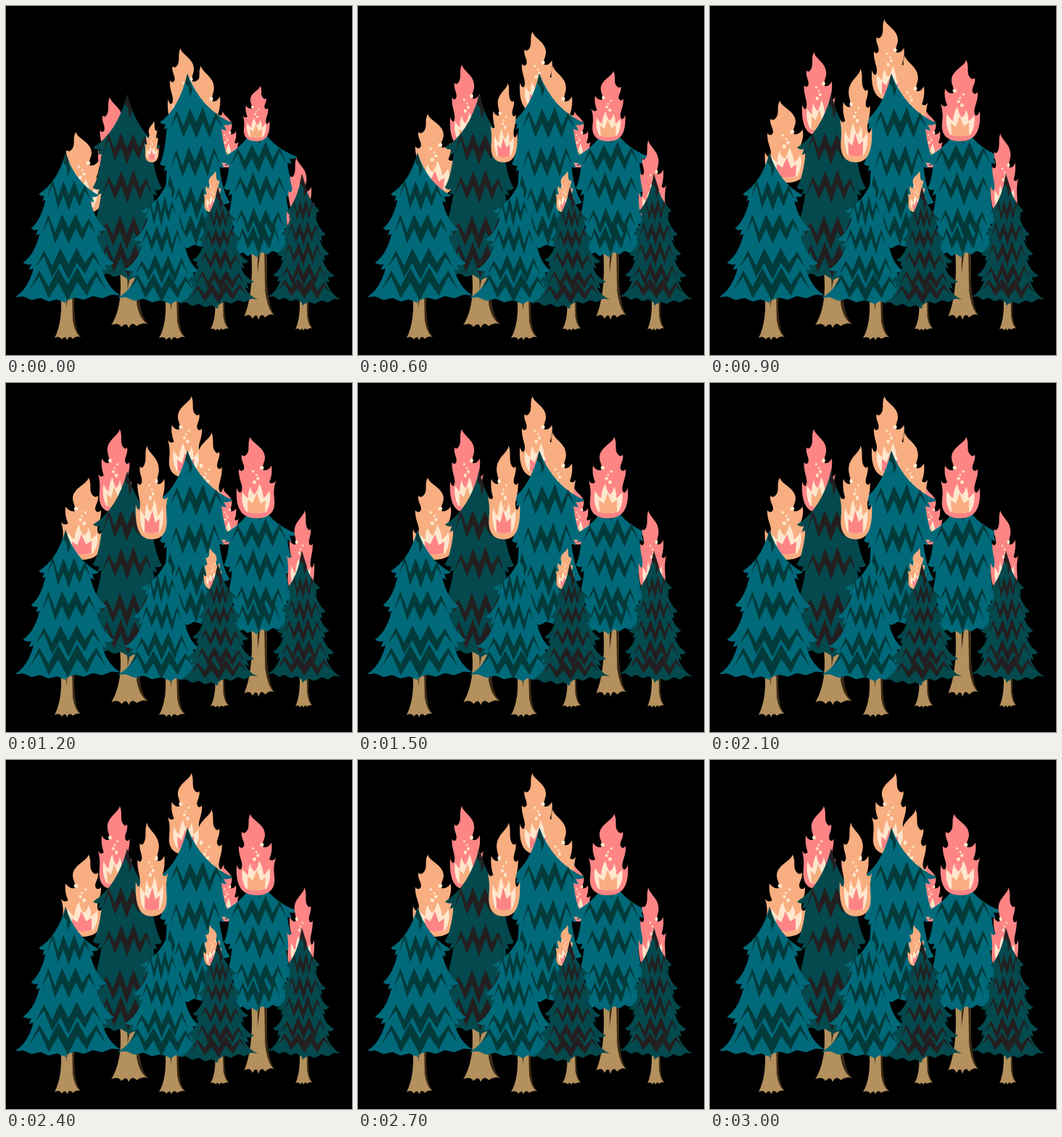
These frames come from a looping animation (477 px wide and 480 px high, 3300 ms). An HTML page with a canvas:

```html
<!DOCTYPE html>
<html lang="en">
<head>
<meta charset="utf-8">
<title>Burning forest</title>
<style>
  html, body { margin: 0; width: 100%; height: 100%; overflow: hidden; background: #000; }
  canvas { display: block; }
</style>
</head>
<body>
<canvas id="stage" width="477" height="480"></canvas>
<script>
const ctx = document.getElementById('stage').getContext('2d');
const STEP = 300, STEPS = 11, GROWN = 3, FLAME_HEIGHT = 113;
const ORANGE = '#f8ae80', PINK = '#ff8585', CREAM = '#ffe6cc';
const TEAL = ['#006a7a', '#033b3b'], DARK = ['#04494d', '#231f20'];
const WOOD = '#b3905d', BARK = '#3a2915';

const mix = (a, b, t) => a + (b - a) * t;
const noise = n => Math.abs(Math.sin(n * 12.9898) * 43758.5453) % 1;

// Flames stand on the origin, trunks hang from it.
const flameBody = new Path2D(`M8-113C7-104-12-99-12-84C-12-78-8-74-9-67
  Q-16-65-21-73Q-23-62-18-50Q-23-46-27-52Q-23-40-25-26C-27-8-17 0 0 0
  C18 0 29-10 27-42Q24-34 21-36C16-44 25-53 24-68Q20-63 17-68
  C15-74 22-80 20-88Q17-84 13-89C8-96 13-104 8-113Z`);
const flameGlow = new Path2D(`M-14-9Q-22-24-18-38Q-14-30-10-28Q-9-40-4-48Q-2-38 2-33
  Q7-36 8-44Q12-36 11-28Q15-30 19-36Q22-22 14-9Q0-5-14-9Z`);
const flameCore = new Path2D('M-12-9L-13-25L-6-20L-1-35L5-21L12-26L12-9Q0-5-12-9Z');
const trunkShape = new Path2D(`M-9 0C-6 25-9 44-17 57Q-10 54-7 59Q-2 53 0 60
  Q3 53 8 58Q14 54 19 56C9 46 9 24 11 0Z`);
const trunkShade = new Path2D('M7 0L11 0C9 24 10 46 19 56Q11 52 8 36ZM-1 0L3 0L-1 22Z');

const sparks = new Path2D();
for (let i = 0; i < 5; i++) {
  const x = mix(-12, 14, noise(i + 3)), y = -50 - i * 5, r = mix(1.4, 3, noise(i + 8));
  sparks.moveTo(x + r, y);
  sparks.arc(x, y, r, 0, 7);
}

function fill(shape, color) {
  ctx.fillStyle = color;
  ctx.fill(shape);
}

function placed(x, y, sx, sy, paint) {
  ctx.save();
  ctx.translate(x, y);
  ctx.scale(sx, sy);
  paint();
  ctx.restore();
}

// A flame climbs by "rise" pixels, or grows from the scale "from", and then sways.
function flame({ x, base, height, color, width = 1, lean = -1, rise = 0, from = 1, delay = 0, sways = true }, step) {
  const time = Math.min(1, Math.max(0, (step - delay) / (GROWN - delay)));
  const growth = time ** .8, size = mix(from, 1, growth);
  const side = sways && step > GROWN && step % 2 === 0 ? -lean : lean;
  placed(x, base + rise * (1 - growth), side * width * size, height / FLAME_HEIGHT * size, () => {
    fill(flameBody, color);
    fill(flameGlow, CREAM);
    fill(flameCore, color === PINK ? ORANGE : PINK);
    fill(sparks, CREAM);
  });
}

// Branch tips spread evenly down one side of a tree; side is -1 or 1.
function branchTips({ x, lean = 0, top, bottom, spread, tiers }, side) {
  return Array.from({ length: tiers }, (_, i) => {
    const t = i / (tiers - 1), jitter = noise(i * 7 + x + side) - .5;
    const reach = mix(spread[0], spread[1], t) + jitter * 4;
    return [x - lean + side * reach, mix(top, bottom, mix(.29, 1, t)) + jitter * 6];
  });
}

function halfTree(x, top, tips) {
  const half = new Path2D();
  let [fromX, fromY] = [x, top];
  half.moveTo(x, top);
  tips.forEach(([tipX, tipY], i) => {
    half.quadraticCurveTo(mix(fromX, tipX, .3), mix(fromY, tipY, .72), tipX, tipY);
    if (i === tips.length - 1) return;
    half.quadraticCurveTo(mix(tipX, x, .1), tipY + 4, mix(tipX, x, .2), tipY + 2);
    half.lineTo(mix(tipX, x, .14), tipY + 10);
    [fromX, fromY] = [mix(tipX, x, .25), tipY + 8];
    half.lineTo(fromX, fromY);
  });
  const [endX, endY] = tips[tips.length - 1];
  for (let k = 1; k <= 6; k++) {
    half.lineTo(mix(endX, x, k / 6), endY + k + (k % 2 ? -2 : 2));
  }
  half.closePath();
  return half;
}

// Zigzag shade that arches between two opposite branches.
function shadeBand([leftX, leftY], [rightX, rightY], height, lift) {
  const band = new Path2D(), count = 8;
  const corner = (k, thickness) => {
    const t = k / count, arch = Math.sin(t * Math.PI);
    const zig = (k % 2 ? -.5 : .4) * height * mix(.6, 1.1, noise(k + leftX));
    band.lineTo(mix(leftX, rightX, mix(.14, .86, t)),
      mix(leftY, rightY, t) - lift + zig + arch * (thickness - height * .25));
  };
  for (let k = 0; k <= count; k++) corner(k, 0);
  for (let k = count - 1; k > 0; k--) corner(k, height * .72);
  band.closePath();
  return band;
}

function tree(shape) {
  const { x, top, bottom, ground, trunk, colors: [leaf, shade], tiers } = shape;
  if (trunk) {
    placed(x + 2, bottom - 8, trunk, (ground - bottom + 8) / 60, () => {
      fill(trunkShape, WOOD);
      fill(trunkShade, BARK);
    });
  }
  const left = branchTips(shape, -1), right = branchTips(shape, 1);
  fill(halfTree(x, top, left), leaf);
  fill(halfTree(x, top, right), leaf);
  const height = Math.min(30, (bottom - top) / tiers * .62);
  left.forEach((tip, i) => {
    fill(shadeBand(tip, right[i], height, i === tiers - 1 ? height * .7 : 2), shade);
  });
  fill(new Path2D(`M${x} ${top}l-3 13 5 6 1 14 4-11Z`), shade);
}

// From back to front.
const scene = [
  [flame, { x: 248, base: 130, height: 112, color: ORANGE, width: .92, rise: 40, delay: 1 }],
  [flame, { x: 276, base: 188, height: 120, color: ORANGE, width: .9, rise: 14, delay: 2 }],
  [flame, { x: 304, base: 222, height: 77, color: PINK, width: .62, sways: false }],
  [tree, { x: 250, lean: -12, top: 93, bottom: 325, spread: [50, 45], tiers: 4, colors: TEAL }],
  [tree, { x: 346, lean: -3, top: 157, bottom: 338, ground: 432, trunk: 1.15, spread: [54, 42], tiers: 4, colors: TEAL }],
  [flame, { x: 345, base: 186, height: 112, color: PINK, lean: 1, from: .68, delay: 1 }],
  [flame, { x: 150, base: 178, height: 115, color: PINK, width: .85, rise: 62 }],
  [flame, { x: 105, base: 243, height: 113, color: ORANGE, width: 1.08, rise: 43, delay: 1 }],
  [tree, { x: 167, top: 122, bottom: 368, ground: 443, trunk: 1.4, spread: [46, 54], tiers: 4, colors: DARK }],
  [flame, { x: 201, base: 215, height: 129, color: ORANGE, width: .82, lean: 1, from: .44 }],
  [tree, { x: 226, lean: 12, top: 233, bottom: 403, ground: 460, trunk: 1, spread: [28, 62], tiers: 4, colors: TEAL }],
  [tree, { x: 82, lean: -4, top: 202, bottom: 398, ground: 460, trunk: 1, spread: [41, 72], tiers: 4, colors: TEAL }],
  [flame, { x: 285, base: 284, height: 57, color: ORANGE, width: .46, lean: 1 }],
  [tree, { x: 292, lean: -3, top: 249, bottom: 406, ground: 447, trunk: .7, spread: [23, 54], tiers: 5, colors: DARK }],
  [flame, { x: 406, base: 290, height: 115, color: PINK, width: .7, rise: 33 }],
  [tree, { x: 408, lean: -2, top: 231, bottom: 403, ground: 447, trunk: .64, spread: [22, 51], tiers: 5, colors: DARK }]
];

const start = performance.now();
function tick() {
  const step = Math.floor((performance.now() - start) / STEP) % STEPS;
  ctx.clearRect(0, 0, 477, 480);
  for (const [paint, options] of scene) paint(options, step);
  requestAnimationFrame(tick);
}
tick();
</script>
</body>
</html>
```
